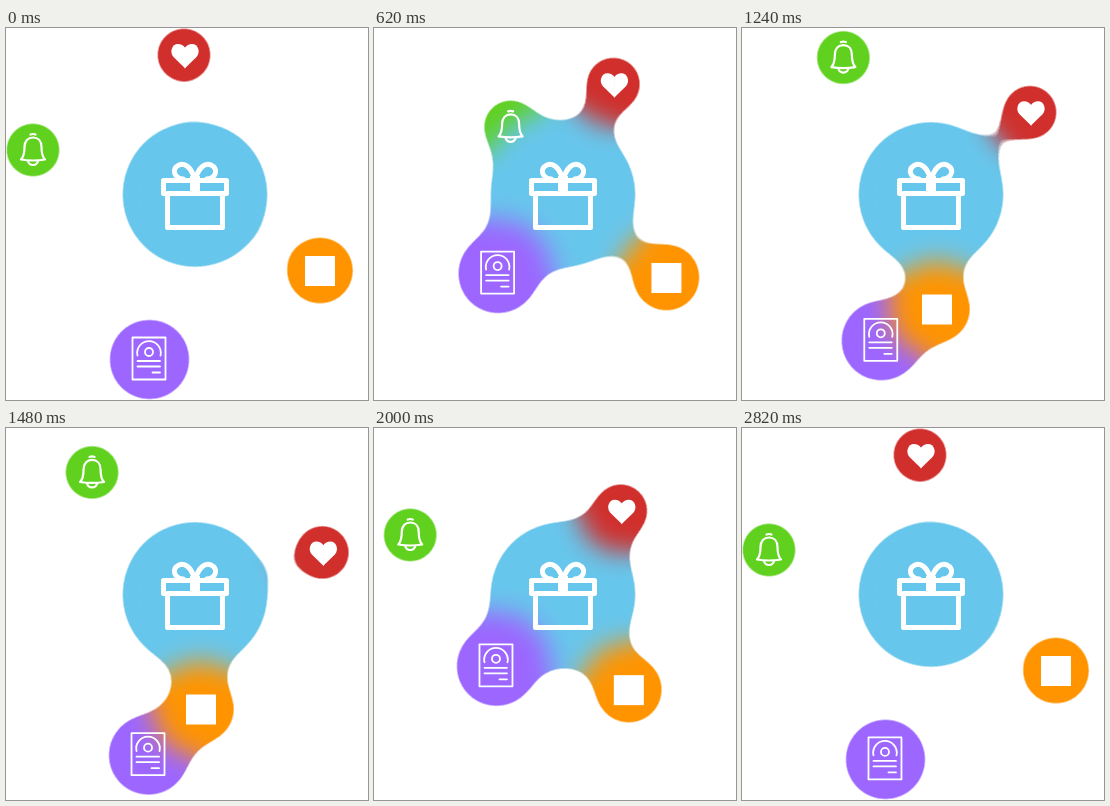
An HTML page for the animation above (2840 ms loop, 362 by 372 pixels).

```html
<!DOCTYPE html>
<html lang="en">
<head>
<meta charset="utf-8">
<title>Gooey bubbles</title>
<style>
  html, body { margin: 0; width: 100%; height: 100%; overflow: hidden; background: #fff; }
  svg { display: block; width: 362px; height: 372px; }
  .line { fill: none; stroke: #fff; stroke-linecap: round; stroke-linejoin: round; }
  .solid { fill: #fff; stroke: none; }
</style>
</head>
<body>
<svg viewBox="0 0 362 372">
  <defs>
    <filter id="goo" filterUnits="userSpaceOnUse" x="-80" y="-80" width="522" height="532" color-interpolation-filters="sRGB">
      <feGaussianBlur id="blur"/>
      <feComponentTransfer><feFuncA id="cut" type="linear"/></feComponentTransfer>
    </filter>
  </defs>
  <g id="blobs" filter="url(#goo)"></g>

  <g class="line" transform="translate(189 167)" stroke-width="5">
    <rect x="-31.5" y="-14.5" width="63" height="13"/>
    <path d="M-27.5 -1V32.500H27.500V-1"/>
    <rect class="solid" x="-5" y="-19" width="10" height="19"/>
    <path id="bow" d="M-1 -18C-4 -27 -10 -33 -16 -30C-24 -26 -21 -17 -12 -16"/>
    <use href="#bow" transform="scale(-1 1)"/>
  </g>

  <g id="heart">
    <path id="lobe" class="solid" transform="translate(1 0)" d="M.3 13.500L-11.500 2C-16 -3 -13 -11 -7 -11Q-2.500 -11 .3 -7Z"/>
    <use href="#lobe" transform="translate(2 0) scale(-1 1)"/>
  </g>
  <g id="bell" class="line" stroke-width="2.2">
    <path d="M0 -12.500C-5 -12.500 -8.500 -9 -8.500 -3Q-8.500 6 -12 9.500Q0 11.500 12 9.500Q8.500 6 8.500 -3C8.500 -9 5 -12.500 0 -12.500Z"/>
    <path d="M-2.500 -15.500Q0 -16.500 2.500 -15.500M-5 11Q-4 15 0 15Q4 15 5 11"/>
  </g>
  <g id="sheet" class="line" stroke-width="1.8">
    <rect x="-17" y="-22" width="33" height="42"/>
    <circle cx="-0.5" cy="-7.5" r="4"/>
    <path d="M-12 -4A11.800 11.800 0 1 1 11 -4M-12 1.500H10.500M-12 7H10.500M3 13H10.500"/>
  </g>
  <rect id="tile" class="solid" x="-15" y="-14.5" width="30" height="30"/>
</svg>

<script>
const LOOP = 2840;
const SIGMA = 12.6;
const GAIN = 30;
const THRESHOLD = 0.85;
const EDGE = 1.036 * SIGMA; // where a blurred straight edge reaches the threshold

const point = (x, y) => ({ x, y });
const stop = (time, at, bend = 0) => ({ time, at, bend });

const bellHome = point(27, 122), bellIn = point(155, 95), bellTop = point(102.5, 28.5);
const heartHome = point(178, 27), heartTurn = point(275, 73), heartOut = point(324, 145.5);
const sheetHome = point(143.5, 331.5), sheetIn = point(121.5, 234);
const tileHome = point(314, 242.5), tileIn = point(195, 281);

// Listed from back to front. A bubble eases from stop to stop; bend bows the leg that leads to a stop.
const bubbles = [
  { icon: "bell", color: "#60d11e", r: 25.3, stops: [
    stop(0, bellHome), stop(825, bellIn), stop(1160, bellTop), stop(2280, bellHome, -9)] },
  { color: "#67c6ec", r: 72, stops: [stop(0, point(189, 166.5))] },
  { icon: "heart", color: "#d02f2c", r: 25.3, stops: [
    stop(0, heartHome), stop(1060, heartTurn), stop(1690, heartOut, 14.5), stop(2290, heartHome)] },
  { icon: "sheet", color: "#9c66ff", r: 39, stops: [
    stop(0, sheetHome), stop(800, sheetIn), stop(LOOP / 2, sheetHome), stop(1870, sheetIn), stop(LOOP, sheetHome)] },
  { icon: "tile", color: "#ff9400", r: 32, stops: [
    stop(390, tileHome), stop(1215, tileIn), stop(1720, tileIn), stop(2280, tileHome)] }
];

const ease = u => (1 - Math.cos(Math.PI * u)) / 2;
const byId = id => document.getElementById(id);

function positionAt(stops, time) {
  const next = stops.findIndex(s => s.time > time);
  if (next === 0) return stops[0].at;
  if (next < 0) return stops[stops.length - 1].at;
  const { time: start, at: a } = stops[next - 1];
  const { time: end, at: b, bend } = stops[next];
  const p = ease((time - start) / (end - start));
  const dx = b.x - a.x, dy = b.y - a.y;
  const bow = 2 * p * (1 - p) * bend / (Math.hypot(dx, dy) || 1);
  return point(a.x + p * dx + bow * dy, a.y + p * dy - bow * dx);
}

// Blur and cut shrink a disc, the smaller the more, so it is drawn larger than it appears.
const sourceRadius = r => r + EDGE + SIGMA * SIGMA / (2 * r);

byId("blur").setAttribute("stdDeviation", SIGMA);
byId("cut").setAttribute("slope", GAIN);
byId("cut").setAttribute("intercept", 0.5 - GAIN * THRESHOLD);

for (const bubble of bubbles) {
  const disc = document.createElementNS("http://www.w3.org/2000/svg", "circle");
  disc.setAttribute("r", sourceRadius(bubble.r));
  disc.setAttribute("fill", bubble.color);
  byId("blobs").append(disc);
  bubble.parts = bubble.icon ? [disc, byId(bubble.icon)] : [disc];
}

function render(time) {
  for (const { stops, parts } of bubbles) {
    const { x, y } = positionAt(stops, time);
    for (const part of parts) part.setAttribute("transform", `translate(${x} ${y})`);
  }
}

const startTime = performance.now();
function tick() {
  render((performance.now() - startTime) % LOOP);
  requestAnimationFrame(tick);
}
render(0);
requestAnimationFrame(tick);
</script>
</body>
</html>
```
